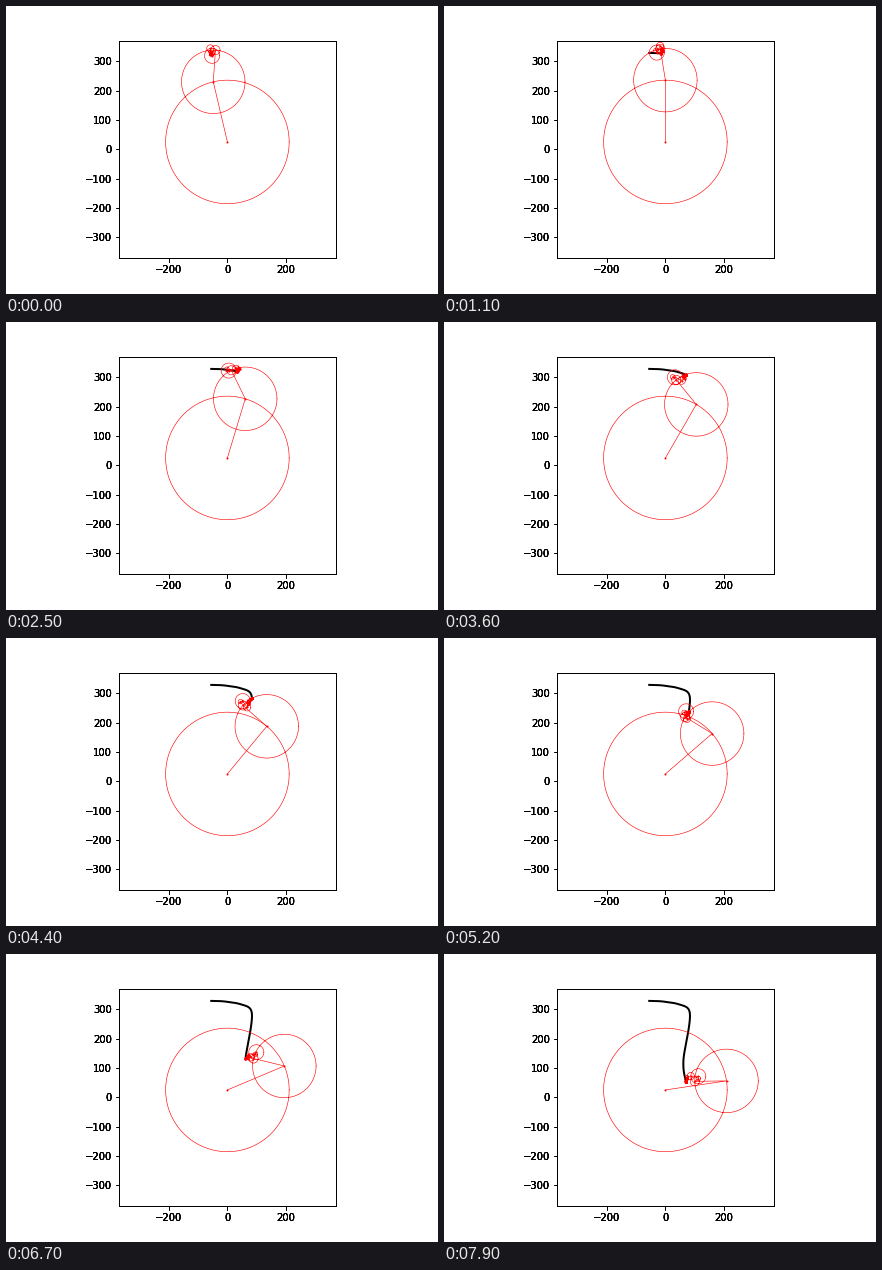
A matplotlib script that plays this animation: 432x288 px, repeating every 8 s.

```python
import numpy as np
import matplotlib.pyplot as plt
from matplotlib.animation import FuncAnimation

FRAMES, TURN = 80, 300      # frames shown, frames per full turn
ORDER = 36
LIM = 370
BASE = 25j
RED = "#ff0000"

rng = np.random.default_rng(8)


def polar(r, deg):
    return r * np.exp(1j * np.radians(deg))


# Pen path: (frame, x, y)
knots = np.array([
    (-8, -83, 329), (0, -55, 328), (11, -16, 327), (25, 34, 320),
    (36, 70, 309), (41, 82, 298), (46, 84.5, 275), (52, 80, 236),
    (60, 70, 182), (67, 61, 133), (73, 61, 92), (79, 70, 53), (87, 86, 3)])


def pen_path():
    k = np.arange(-4, FRAMES + 4)
    z = np.interp(k, knots[:, 0], knots[:, 1]) \
        + 1j * np.interp(k, knots[:, 0], knots[:, 2])
    w = np.hanning(11)[1:-1]
    return np.convolve(z, w / w.sum(), "valid")


# Rotating vectors in the order -1, 1, -2, 2, ...
freqs = np.array([s * n for n in range(1, ORDER + 1) for s in (-1, 1)])
mag = 40 / np.abs(freqs) ** 1.5
prior = mag * rng.uniform(0.5, 1.1, freqs.size) \
    * np.exp(2j * np.pi * rng.random(freqs.size))
prior[:6] = [polar(210.3, 103.2), polar(108, 86), polar(15, 225),
             polar(8, 265), polar(27, 104), polar(11, -95)]
spread = mag.copy()
spread[:6] = [0.5, 0.7, 1.5, 1.5, 2, 5]

# Nudge the vectors so that their sum follows the pen path
spin = np.exp(2j * np.pi * np.outer(np.arange(FRAMES), freqs) / TURN)
miss = pen_path() - BASE - spin @ prior
lhs = np.vstack([spin * spread / 0.4, np.eye(freqs.size)])
rhs = np.concatenate([miss / 0.4, np.zeros(freqs.size)])
coefs = prior + spread * np.linalg.lstsq(lhs, rhs, rcond=None)[0]

joints = BASE + np.cumsum(
    np.hstack([np.zeros((FRAMES, 1)), spin * coefs]), axis=1)
trail = joints[:, -1]

# One closed ring per vector, separated by NaN
ring = np.append(np.exp(1j * np.linspace(0, 2 * np.pi, 100)), np.nan)
rings = np.abs(coefs)[:, None] * ring

fig = plt.figure(figsize=(6, 4), dpi=72, facecolor="white")
rect = [112.68 / 432, 0.125, 217.44 / 432, 0.755]


def add_frame():
    ax = fig.add_axes(rect, xlim=(-LIM, LIM), ylim=(-LIM, LIM))
    ax.patch.set_visible(False)
    ax.set_xticks(range(-200, 201, 200))
    ax.set_yticks(range(-300, 301, 100))
    return ax


# Stacked copies give the heavy, hard-edged labels
ax = [add_frame() for _ in range(4)][0]

trace, = ax.plot([], [], color="black", lw=2, zorder=2)
circles, = ax.plot([], [], color=RED, lw=0.6, zorder=3)
arms, = ax.plot([], [], color=RED, lw=0.6, zorder=3)
dots, = ax.plot([], [], "o", color=RED, ms=2, mew=0, zorder=4)


def put(line, z):
    line.set_data(z.real, z.imag)


def update(k):
    chain = joints[k]
    put(circles, (chain[:-1, None] + rings).ravel())
    put(arms, chain)
    put(dots, chain[:-1])
    put(trace, trail[:k + 1])
    return circles, arms, dots, trace


anim = FuncAnimation(fig, update, frames=FRAMES, interval=100,
                     repeat=True, repeat_delay=0, blit=False)
plt.show()
```
